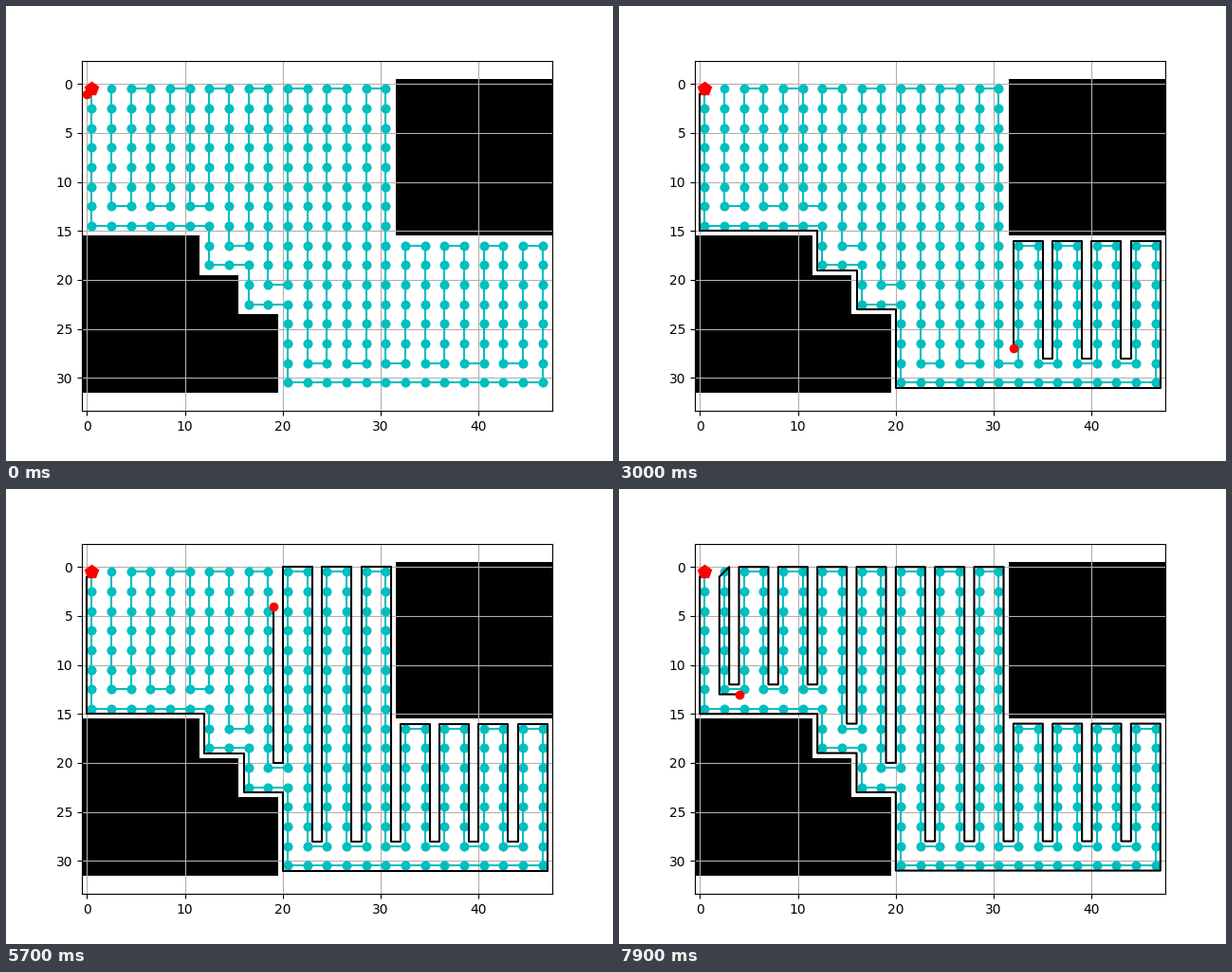
These frames come from a looping animation (640 px wide and 480 px high, 8000 ms). A matplotlib script:

```python
import math

import matplotlib.pyplot as plt
import numpy as np
from matplotlib.animation import FuncAnimation

FRAMES, INTERVAL, STRIDE = 80, 100, 4
WIDTH, HEIGHT = 48, 32

# direction: cell step, corner where a cell is left, corner where the next is entered
MOVES = {
    "S": ((0, 1), (0, 1), (0, 0)),
    "E": ((1, 0), (1, 1), (0, 1)),
    "N": ((0, -1), (1, 0), (1, 1)),
    "W": ((-1, 0), (0, 0), (1, 0)),
    "U": ((0, 0), (1, 0), (0, 0)),  # turn around at the tip of a branch
}


def comb(depth, up=None):
    """One tooth: over, down, over, up again."""
    return "W" + "S" * depth + "W" + "N" * (up or depth)


def make_map():
    grid = np.zeros((HEIGHT, WIDTH))
    grid[:16, 32:] = 1
    grid[16:, :12] = 1
    grid[20:, :16] = 1
    grid[24:, :20] = 1
    return grid


def walk_cells(route):
    """Centres of the coarse cells along the route."""
    cells = [(0, 0)]
    for d in route:
        dx, dy = MOVES[d][0]
        x, y = cells[-1]
        cells.append((x + dx, y + dy))
    return 2 * np.array(cells) + 0.5


def walk_corners(route):
    """Fine path that keeps to one side of the tree."""
    cx = cy = 0
    last = (0, 1)
    points = [last]
    prev = route[0]
    for d in route:
        (dx, dy), leave, enter = MOVES[d]
        p = (2 * cx + leave[0], 2 * cy + leave[1])
        if math.dist(p, last) > 1:
            bend = (last[0], p[1]) if prev in "NS" else (p[0], last[1])
            points += [last, bend]
        points.append(p)
        cx, cy = cx + dx, cy + dy
        last = (2 * cx + enter[0], 2 * cy + enter[1])
        prev = d
    points.append(last)
    return np.array(points)


outward = "S" * 7 + "E" * 6 + ("SSEE") * 2 + "S" * 4 + "E" * 13 + "N" * 7
outward += comb(6) * 3 + comb(6, 14) + comb(14) * 2
outward += comb(10) + comb(8) + comb(6) * 3
tree = walk_cells(outward)
track = walk_corners(outward + "U" + "S" * 6 + "EN")

fig, ax = plt.subplots(figsize=(6.4, 4.8), dpi=100)
ax.imshow(make_map(), cmap="binary", aspect="auto")
ax.plot(*tree.T, "-oc")
ax.plot(*tree[1:-1].T, "oc")
ax.plot(0.5, 0.5, "pr", markersize=10)
trail, = ax.plot([], [], "-k")
head, = ax.plot([], [], "or")

# equal units on both axes, centred on the map
half = 0.5 * WIDTH * (0.77 * 4.8) / (0.775 * 6.4)
mid = (HEIGHT - 1) / 2
ax.set_xlim(-0.5, WIDTH - 0.5)
ax.set_ylim(mid + half, mid - half)
ax.grid(True)


def update(i):
    k = i * STRIDE
    trail.set_data(*track[:k + 1].T)
    head.set_data(*track[k:k + 1].T)
    return trail, head


ani = FuncAnimation(fig, update, frames=FRAMES, interval=INTERVAL,
                    init_func=lambda: update(0), repeat=True, repeat_delay=0)
plt.show()
```
